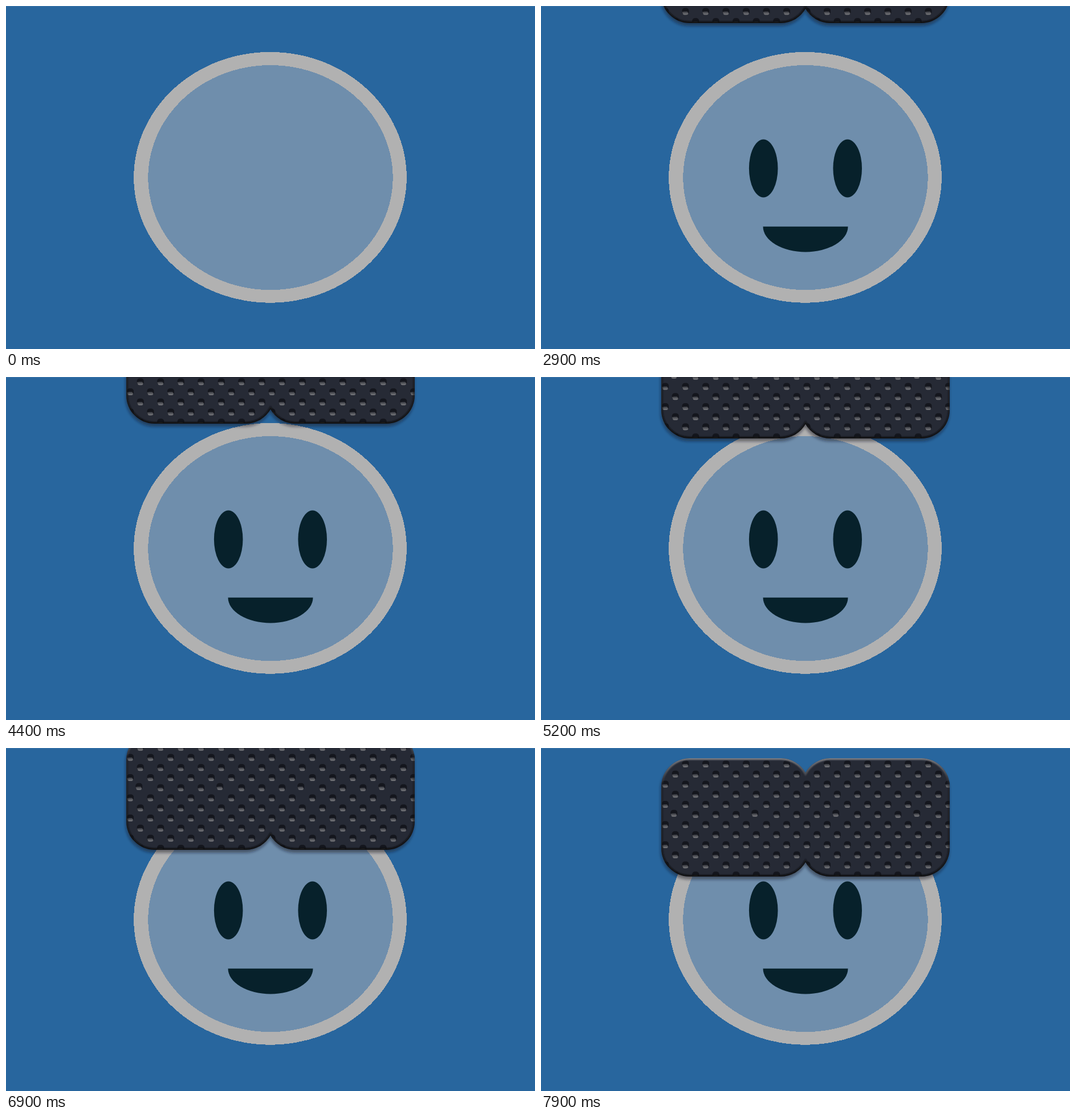
An HTML page that plays this animation: 928x603 px, repeating every 8000 ms.

```html
<!DOCTYPE html>
<html lang="en">
<head>
<meta charset="utf-8">
<title>Smiling face</title>
<style>
  html, body { margin: 0; width: 100%; height: 100%; overflow: hidden; background: #28669e; }
  svg { display: block; width: 100vw; height: 100vh; }
</style>
</head>
<body>
<svg viewBox="0 0 928 603">
  <defs>
    <path id="outline" d="M261 0H421A50 50 0 0 1 464 25.5A50 50 0 0 1 507 0H667A50 50 0 0 1 717 50V158A50 50 0 0 1 667 208H507A50 50 0 0 1 464 182.5A50 50 0 0 1 421 208H261A50 50 0 0 1 211 158V50A50 50 0 0 1 261 0Z"/>
    <clipPath id="inside"><use href="#outline"/></clipPath>
    <filter id="shadow" filterUnits="userSpaceOnUse" x="190" y="-20" width="550" height="260">
      <feDropShadow dx="-1" dy="5" stdDeviation="2.5" flood-color="#0a1420" flood-opacity=".5"/>
    </filter>
    <filter id="soften" filterUnits="userSpaceOnUse" x="190" y="-20" width="550" height="260">
      <feGaussianBlur stdDeviation="1.2"/>
    </filter>
    <linearGradient id="bevel" gradientUnits="userSpaceOnUse" x1="0" y1="0" x2="0" y2="208">
      <stop offset="0" stop-color="#8a8b90" stop-opacity=".85"/>
      <stop offset=".12" stop-color="#6a6b70" stop-opacity=".6"/>
      <stop offset=".25" stop-color="#14161c" stop-opacity=".4"/>
      <stop offset=".75" stop-color="#0e1016" stop-opacity=".6"/>
      <stop offset="1" stop-color="#08090d" stop-opacity=".95"/>
    </linearGradient>
    <linearGradient id="glint" x1="0" y1="0" x2="0" y2="1">
      <stop offset="0" stop-color="#34363d"/>
      <stop offset="1" stop-color="#7b7c80"/>
    </linearGradient>
    <g id="stud">
      <path d="M-6 2V-2Q-5 -6 -1 -6H2Q6 -5 6 -1V3L3 5H-4Z" fill="#14161d"/>
      <path d="M-6 1L-2 0H3L5 3L4 5.5Q0 6.5 -4 5.5Z" fill="url(#glint)"/>
    </g>
  </defs>

  <rect width="928" height="603" fill="#28669e"/>
  <rect width="928" height="1" fill="#3a74a8"/>
  <g shape-rendering="crispEdges">
    <ellipse cx="463.5" cy="301.3" rx="239.3" ry="220.4" fill="#b1b1b1"/>
    <ellipse cx="464" cy="301.6" rx="214.7" ry="197.6" fill="#6f8eac"/>
  </g>
  <g id="eyes" fill="#07212b">
    <ellipse cx="390.2" cy="285.5" rx="25.3" ry="51"/>
    <ellipse cx="537.7" cy="285.5" rx="25.3" ry="51"/>
  </g>
  <path id="mouth" d="M389.5 387.7H538.5A74.5 44.7 0 0 1 389.5 387.7Z" fill="#07212b"/>
  <g id="hair">
    <use href="#outline" fill="#282b36" filter="url(#shadow)"/>
    <g clip-path="url(#inside)">
      <g id="studs"></g>
      <use href="#outline" fill="none" stroke="url(#bevel)" stroke-width="6" filter="url(#soften)"/>
    </g>
  </g>
</svg>
<script>
  const LOOP = 8000, STEP = 100, HAIR_HEIGHT = 208;
  const EYES_AT = 1000, MOUTH_AT = 1500, HAIR_AT = 2000;

  // [time in ms, lower edge of the hair]
  const edgeKeys = [
    [2000, -1], [2800, 26], [3600, 54], [3700, 56], [4600, 89], [5200, 108],
    [5500, 118], [6200, 143], [6400, 157], [6900, 179], [7300, 196], [7900, 226]
  ];

  const byId = id => document.getElementById(id);
  const [eyes, mouth, hair, studs] = ['eyes', 'mouth', 'hair', 'studs'].map(byId);

  function addStud(x, y) {
    const stud = document.createElementNS('http://www.w3.org/2000/svg', 'use');
    stud.setAttribute('href', '#stud');
    stud.setAttribute('transform', `translate(${x} ${y})`);
    studs.append(stud);
  }

  // Staggered rows; every fourth stud of one row sits a little off the grid.
  for (let row = 0; row < 12; row++) {
    for (let col = 0; col < 15; col++) {
      const off = row === 5 && col % 4 === 0;
      const x = 218 + 35.5 * col + (row % 2) * 17.75;
      const y = 10 + 17.75 * row;
      addStud(x - (off ? 2.5 : 0), y - (off ? 2 : 0));
    }
  }

  function hairEdge(time) {
    const next = edgeKeys.findIndex(([at]) => at >= time);
    if (next < 1) return edgeKeys[next < 0 ? edgeKeys.length - 1 : 0][1];
    const [t0, y0] = edgeKeys[next - 1], [t1, y1] = edgeKeys[next];
    return y0 + (y1 - y0) * (time - t0) / (t1 - t0);
  }

  const show = (part, visible) => part.setAttribute('visibility', visible ? 'visible' : 'hidden');

  function draw() {
    const time = Math.floor(performance.now() % LOOP / STEP) * STEP;
    show(eyes, time >= EYES_AT);
    show(mouth, time >= MOUTH_AT);
    show(hair, time >= HAIR_AT);
    hair.setAttribute('transform', `translate(0 ${Math.round(hairEdge(time)) - HAIR_HEIGHT})`);
    requestAnimationFrame(draw);
  }
  draw();
</script>
</body>
</html>
```
